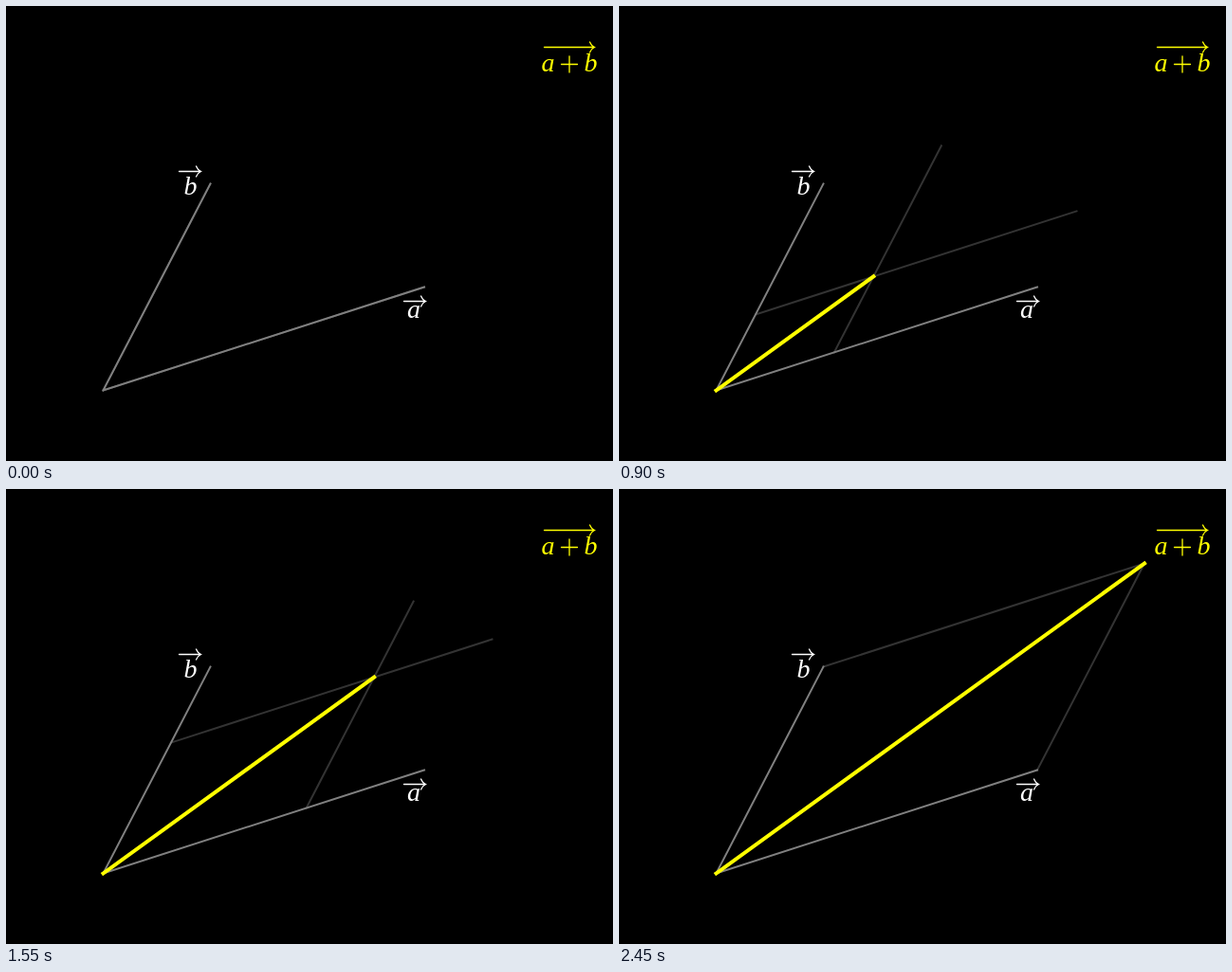
Write an HTML page that moves like this. It is 640x480 px and loops after 2.5 s.

```html
<!DOCTYPE html>
<html lang="en">
<head>
<meta charset="utf-8">
<title>Vector addition</title>
<style>
  html, body { margin: 0; width: 100%; height: 100%; overflow: hidden; background: #000; }
  svg { display: block; width: 640px; height: 480px; }
  path { fill: none; stroke-width: 2; stroke-linecap: square; }
  text { font: italic 28px "Liberation Serif", serif; fill: currentColor; }
  .mark { stroke: currentColor; stroke-width: 1.3; stroke-linecap: round; }
</style>
</head>
<body>
<svg viewBox="0 0 640 480">
  <path id="guides" stroke="#333"/>
  <path id="sides" stroke="#808080"/>
  <path id="sum" stroke="#ff0" style="stroke-width:4"/>
  <g color="#fff">
    <text x="423" y="329">a</text>
    <path class="mark" data-arrow="419.5 442.5 311.5"/>
    <text x="187.5" y="199">b</text>
    <path class="mark" data-arrow="182.5 205.5 174.5"/>
  </g>
  <g color="#ff0">
    <text x="564.5" y="69">a</text>
    <path class="mark" d="M585.5 61.5H602.5M594 53V70"/>
    <text x="609.5" y="69">b</text>
    <path class="mark" data-arrow="567.5 620.5 43.5"/>
  </g>
</svg>
<script>
const STEP = 50, STEPS = 50;
const origin = [102.5, 405.5], a = [338.5, -109], b = [113, -218];
const byId = id => document.getElementById(id);

// Point origin + p*a + q*b
const at = (p, q) => origin.map((o, i) => o + p * a[i] + q * b[i]);
const line = (from, to) => `M${from}L${to}`;

for (const arrow of document.querySelectorAll('[data-arrow]')) {
  const [left, right, y] = arrow.dataset.arrow.split(' ').map(Number);
  arrow.setAttribute('d', `M${left} ${y}H${right}M${right - 5} ${y - 5.5}` +
    `Q${right - 3.5} ${y - 1.5} ${right} ${y}Q${right - 3.5} ${y + 1.5} ${right - 5} ${y + 5.5}`);
}

byId('sides').setAttribute('d', line(at(0, 0), at(1, 0)) + line(at(0, 0), at(0, 1)));

function draw() {
  const s = Math.floor(performance.now() / STEP) % STEPS / (STEPS - 1);
  byId('guides').setAttribute('d', line(at(s, 0), at(s, 1)) + line(at(0, s), at(1, s)));
  byId('sum').setAttribute('d', s ? line(at(0, 0), at(s, s)) : '');
  requestAnimationFrame(draw);
}
draw();
</script>
</body>
</html>
```
